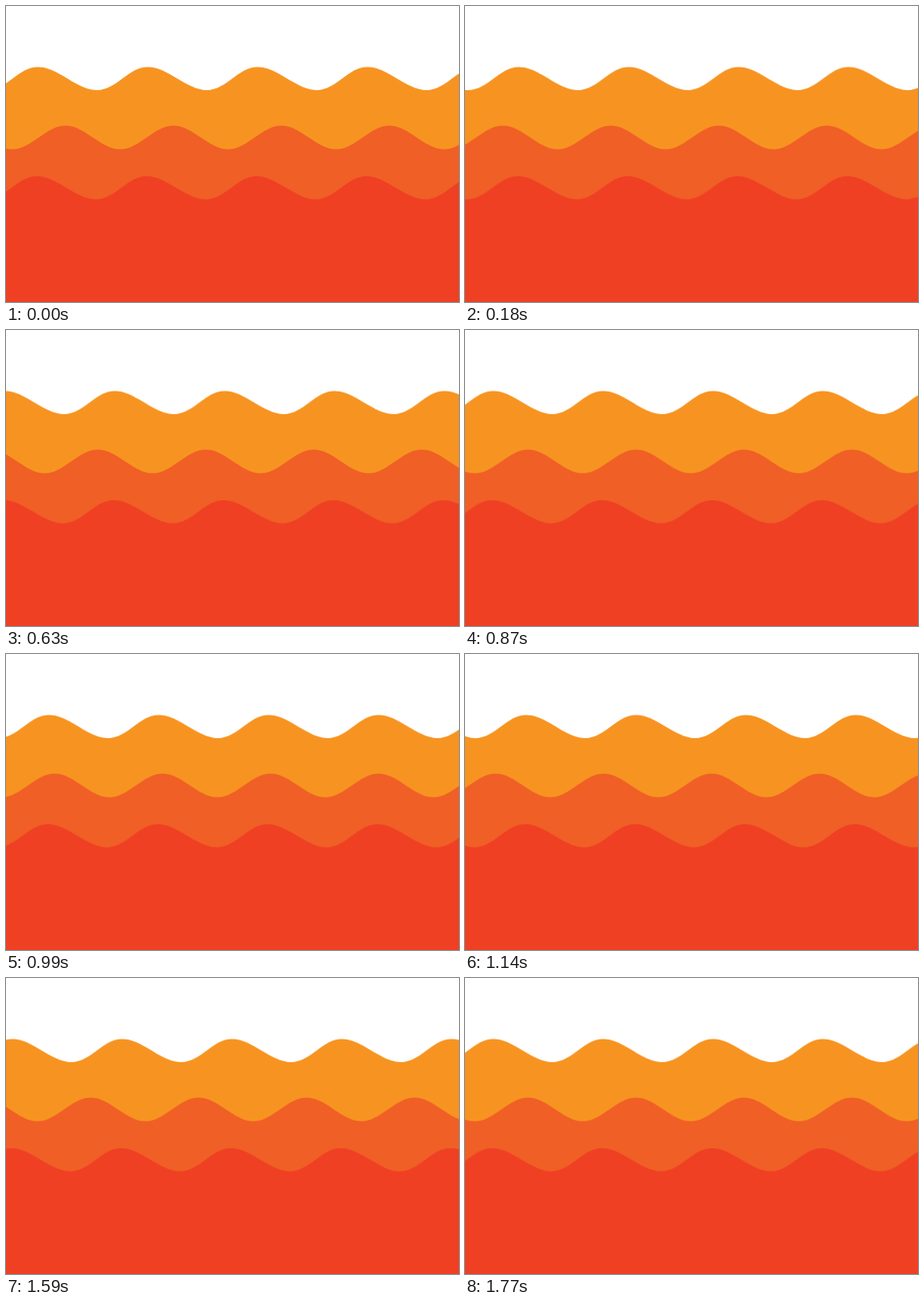
These frames come from a looping animation (480 by 313 pixels, 1.8 s). An HTML page without scripts:

```html
<!DOCTYPE html>
<html lang="en">
<head>
<meta charset="utf-8">
<title>Waves</title>
<style>
html, body { margin: 0; width: 100%; height: 100%; overflow: hidden; background: #fff; }
svg { display: block; width: 100%; height: 100%; }
/* each wave travels one wavelength, then repeats */
path { animation: drift 900ms steps(30) infinite; }
.back { --wave: 116.4px; fill: #f79421; }
.mid { --wave: -114.4px; fill: #f05f26; }
.front { --wave: 116.4px; fill: #ef4024; }
@keyframes drift { to { transform: translateX(var(--wave)); } }
</style>
</head>
<body>
<svg viewBox="0 0 480 313" preserveAspectRatio="none">
  <path class="back" d="M-198.8 64.6
    c21.2 0 41.2 24.4 62.4 24.4 s32.8-24.4 54-24.4
    s41.2 24.4 62.4 24.4 s32.8-24.4 54-24.4
    s41.2 24.4 62.4 24.4 s32.8-24.4 54-24.4
    s41.2 24.4 62.4 24.4 s32.8-24.4 54-24.4
    s41.2 24.4 62.4 24.4 s32.8-24.4 54-24.4
    s41.2 24.4 62.4 24.4 s32.8-24.4 54-24.4
    V320 H-198.8z"/>
  <path class="mid" d="M-51.4 126.4
    c20.8 0 37.2 25 58 25 s35.6-25 56.4-25
    s37.2 25 58 25 s35.6-25 56.4-25
    s37.2 25 58 25 s35.6-25 56.4-25
    s37.2 25 58 25 s35.6-25 56.4-25
    s37.2 25 58 25 s35.6-25 56.4-25
    s37.2 25 58 25 s35.6-25 56.4-25
    V320 H-51.4z"/>
  <path class="front" d="M-200 180.1
    c21.2 0 41.2 24.4 62.4 24.4 s32.8-24.4 54-24.4
    s41.2 24.4 62.4 24.4 s32.8-24.4 54-24.4
    s41.2 24.4 62.4 24.4 s32.8-24.4 54-24.4
    s41.2 24.4 62.4 24.4 s32.8-24.4 54-24.4
    s41.2 24.4 62.4 24.4 s32.8-24.4 54-24.4
    s41.2 24.4 62.4 24.4 s32.8-24.4 54-24.4
    V320 H-200z"/>
</svg>
</body>
</html>
```
